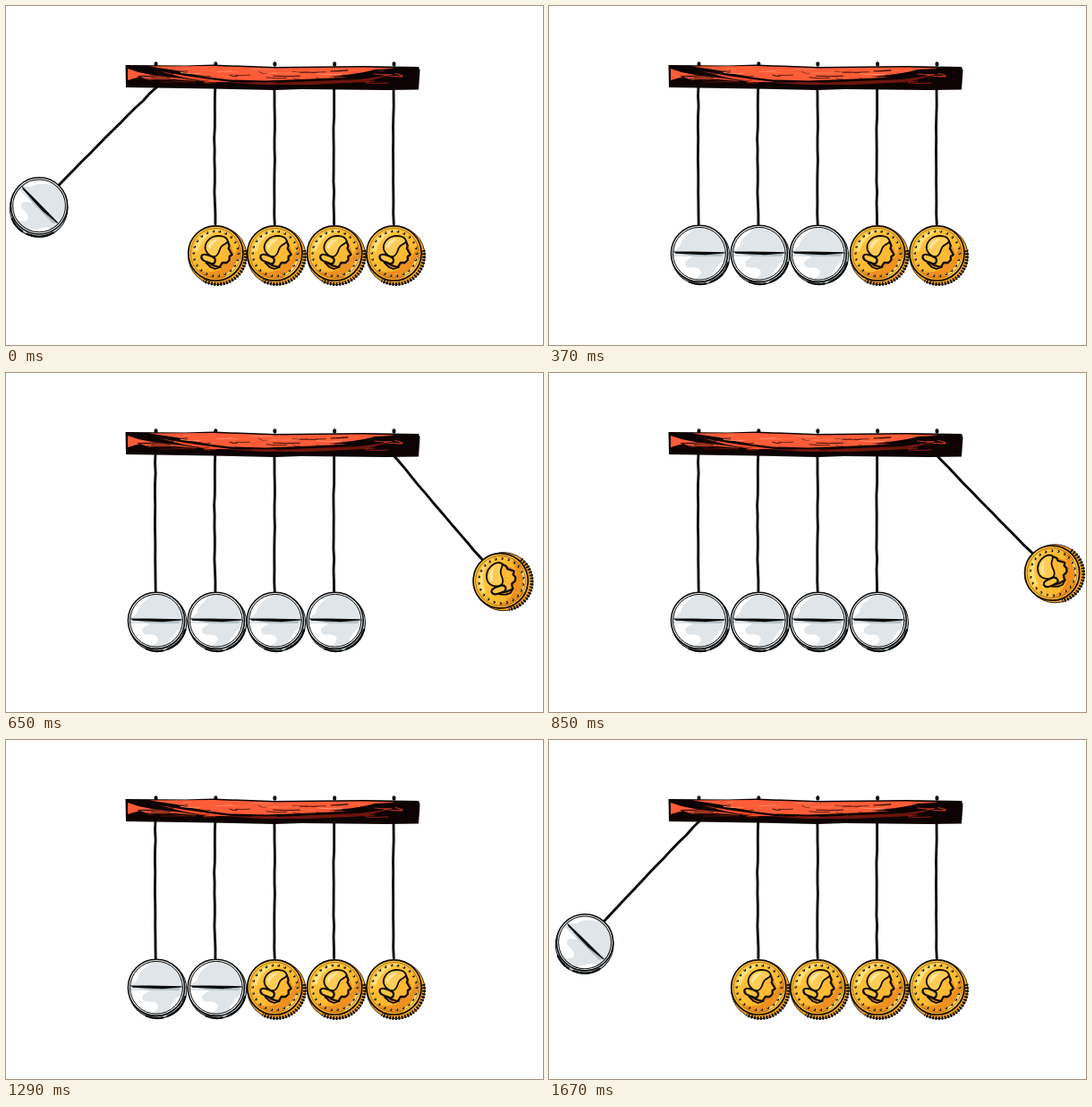
Recreate the animation shown at these times as an HTML page. Size 600 by 379 pixels, loop 1.77 s.

```html
<!DOCTYPE html>
<html lang="en">
<head>
<meta charset="utf-8">
<title>Pendulum of pills and coins</title>
<style>
  html, body { margin: 0; width: 100%; height: 100%; overflow: hidden; background: #fff; }
  svg { display: block; width: 100vw; height: 100vh; }
  .line { fill: none; stroke: #0b0b0b; stroke-linecap: round; stroke-linejoin: round; }
</style>
</head>
<body>
<svg viewBox="0 0 600 379">
  <defs>
    <linearGradient id="gold" x1=".15" y1=".05" x2=".8" y2="1">
      <stop offset="0" stop-color="#ffc842"/>
      <stop offset=".6" stop-color="#ffba30"/>
      <stop offset="1" stop-color="#f7a022"/>
    </linearGradient>
    <clipPath id="disc"><circle cx="-.8" cy="-1.2" r="29.6"/></clipPath>

    <g id="pill">
      <circle cx=".7" cy=".9" r="32.9" fill="#0d1215"/>
      <circle cx=".6" cy=".8" r="32" fill="#c3d5dd"/>
      <path class="line" stroke-width="2.4" d="M31.5 9A32 32 0 0 1 12 30.5M6 32.4A32 32 0 0 1-12 30.5"/>
      <circle cx="-.8" cy="-1.2" r="31.6" fill="#fcfdfd" stroke="#0b0b0b" stroke-width="1.6"/>
      <g clip-path="url(#disc)">
        <circle cx="-.8" cy="-1.2" r="30" fill="#dfe5e9"/>
        <path fill="#fff" d="M-31 2H-8C-14 6-18 7-16 12C-13 17-4 12 0 17C4 22-4 26-10 31L-31 20Z"/>
        <path fill="#fff" d="M12 30C10 23 16 20 19 14C21 10 24 8 31 6V24Z"/>
        <path fill="#fff" d="M-28-5C-29-16-19-27-7-28C-14-23-21-18-22-10Z"/>
        <path fill="#b4c0c6" d="M-26-2H27L24 2L-10 1.4Z"/>
      </g>
      <circle class="line" cx="-.8" cy="-1.2" r="29.4" stroke-width="1"/>
      <path fill="#0b0b0b" d="M-30-3.4L-8-3.4L28-2.8L27-1.5L6 .3L-27-1.3Z"/>
    </g>

    <g id="coin">
      <circle cx=".6" cy="1.1" r="32.6" fill="#f6a522" stroke="#120b03" stroke-width=".8"/>
      <path class="line" stroke-width="4" stroke-dasharray="1.8 1.6" style="stroke-linecap:butt"
        d="M31.6-5A31.6 31.6 0 0 1-15 28.8"/>
      <circle cx="-1.3" cy="-1.6" r="30.6" fill="url(#gold)" stroke="#120b03" stroke-width="1.7"/>
      <path fill="#ef9020" d="M25-12C29 3 21 18 7 25C-4 28-15 25-21 17C-10 21-1 20 7 14C16 7 21 0 25-12Z"/>
      <path fill="#ffdf7c" d="M-26-4C-25-18-11-29 4-28C-8-24-18-17-21-4Z"/>
      <path fill="#ffd666" d="M8 23C16 19 21 12 23 4L27 5C25 15 17 22 11 25Z"/>
      <circle class="line" cx="-1.3" cy="-1.6" r="28" stroke-width=".6" style="stroke:#7a4307"/>
      <circle class="line" cx="-1" cy="-1.2" r="25" stroke-width="2.8" stroke-dasharray="0 7.14"/>
      <circle class="line" cx="-1.5" cy="-1.8" r="25" stroke-width="1.5" stroke-dasharray="0 7.14" style="stroke:#ffd965"/>
      <path fill="#e88a1b" d="M-14 9L-6 15L5 15L13 9L19-1L14-13L11 5Z"/>
      <path d="M3-17L12-15L14-10L13-7L17 0L14 2L14 6L11 9L6 9L3 14L-4 12L-10 8L-5-4Z"
        fill="#ffba33" stroke="#120b03" stroke-width="2.3" stroke-linejoin="round"/>
      <path d="M-12-4C-15-10-11-17-4-20C2-22 10-21 12-16C13-12 8-13 5-9C2-5 3 0-2 2C-6 3-10 0-12-4Z"
        fill="#ffcd55" stroke="#120b03" stroke-width="1.8"/>
      <path d="M-17 1C-15-2-8 1-4 3C0 5-2 11-6 10C-11 8-19 7-17 1Z"
        fill="#ffc441" stroke="#120b03" stroke-width="2.2"/>
      <path class="line" stroke-width="1.8" d="M-12 9L-7 14L-2 16L4 14"/>
      <path fill="#ffe6a0" d="M-10-9C-8-15-3-18 3-18C-2-14-6-11-8-6Z"/>
    </g>
  </defs>
  <g id="balls"></g>
  <g id="beam"></g>
</svg>
<script>
const NS = 'http://www.w3.org/2000/svg';
const LOOP = 1770;
const PIVOTS = [167, 233.8, 299.8, 366.6, 433];
const PIVOT_Y = 92, REACH = 186;

// [start ms, left angle, right angle, number of pills]
const POSES = [
  [0, 45, 0, 1], [200, 41, 0, 1], [300, 23, 0, 1], [370, 0, 0, 3],
  [440, 0, 15, 4], [510, 0, 26, 4], [580, 0, 34.5, 4], [650, 0, 40.3, 4],
  [750, 0, 43, 4], [850, 0, 44.3, 4], [1050, 0, 40, 4], [1150, 0, 27.4, 4],
  [1220, 0, 13, 4], [1290, 0, 0, 2], [1360, 16, 0, 1], [1430, 30.2, 0, 1],
  [1500, 37.5, 0, 1], [1570, 42, 0, 1], [1670, 43.7, 0, 1]
];

let seed = 7;
function rand(a, b) {
  seed = (seed * 16807) % 2147483647;
  return a + (b - a) * seed / 2147483647;
}

function add(parent, tag, attrs) {
  const el = document.createElementNS(NS, tag);
  for (const k in attrs) el.setAttribute(k, attrs[k]);
  return parent.appendChild(el);
}

// Uneven ink line hanging from the pivot
function cord(parent, bend) {
  let d = 'M0-2';
  for (let y = 8; y <= 156; y += 12) {
    const x = bend * Math.sin(y / 154 * Math.PI) + rand(-.4, .4);
    d += `L${x.toFixed(1)} ${y}`;
  }
  add(parent, 'path', { d, class: 'line', 'stroke-width': 2.9 });
}

const balls = PIVOTS.map((x, i) => {
  const arm = add(document.getElementById('balls'), 'g', {});
  cord(arm, [-.5, -.9, .3, -.5, -.3][i]);
  const disc = add(arm, 'use', { transform: `translate(1.8 ${REACH})` });
  return { x, arm, disc };
});

function streaks(parent, count, color, x0, x1, y0, y1) {
  for (let i = 0; i < count; i++) {
    const x = rand(x0, x1), y = rand(y0, y1), w = rand(8, 32), dy = rand(-1.2, 1.8);
    add(parent, 'path', {
      d: `M${x} ${y}q${w / 2} ${dy + 1} ${Math.min(w, x1 + 8 - x)} ${dy}`,
      fill: 'none', stroke: color, 'stroke-width': rand(.4, 1.1)
    });
  }
}

function drawBeam() {
  const g = document.getElementById('beam');
  const fill = (d, color) => add(g, 'path', { d, fill: color });
  PIVOTS.forEach(x => add(g, 'ellipse', { cx: x + .5, cy: 65, rx: 2, ry: 2.8, fill: '#0b0b0b' }));
  fill('M133.5 66L200 66.5L232 65.5L300 68L400 67L461 68L462.5 72L461 93.5L425 94L330 93L300 94L230 92.5L134 91Z', '#0d0303');
  // Lit wood, sagging towards the middle
  fill('M160 67.5L232 67L300 69.5L400 68.5L434 69.5L408 75L375 80L330 82L290 83.5L250 82.5L222 79L190 72Z', '#ff5c38');
  fill('M136 70L148 74L168 78L196 81L215 84L185 82L160 83L150 79L136 83Z', '#ff5c38');
  fill('M172 73L200 78L228 82L252 85L225 85L198 80Z', '#f04e2d');
  fill('M240 85L300 86L345 84L395 82L430 77L402 85L340 88L285 88Z', '#6d150c');
  fill('M360 79Q395 76 412 71L434 70L420 75L395 80Z', '#0d0303');
  streaks(g, 14, '#1f0604', 215, 380, 72, 81);
  streaks(g, 8, '#1f0604', 140, 195, 71, 82);
  streaks(g, 8, '#ff8a62', 190, 380, 69, 76);
  streaks(g, 9, '#8e2011', 170, 420, 82, 87);
  streaks(g, 4, '#c23a20', 395, 435, 72, 80);
}

function draw(now) {
  const t = now % LOOP;
  const [, left, right, pills] = POSES.findLast(p => p[0] <= t);
  balls.forEach(({ x, arm, disc }, i) => {
    const angle = i === 0 ? left : i === 4 ? -right : 0;
    arm.setAttribute('transform', `translate(${x} ${PIVOT_Y}) rotate(${angle})`);
    disc.setAttribute('href', i < pills ? '#pill' : '#coin');
  });
}

drawBeam();
const start = performance.now();
function tick() {
  draw(performance.now() - start);
  requestAnimationFrame(tick);
}
tick();
</script>
</body>
</html>
```
